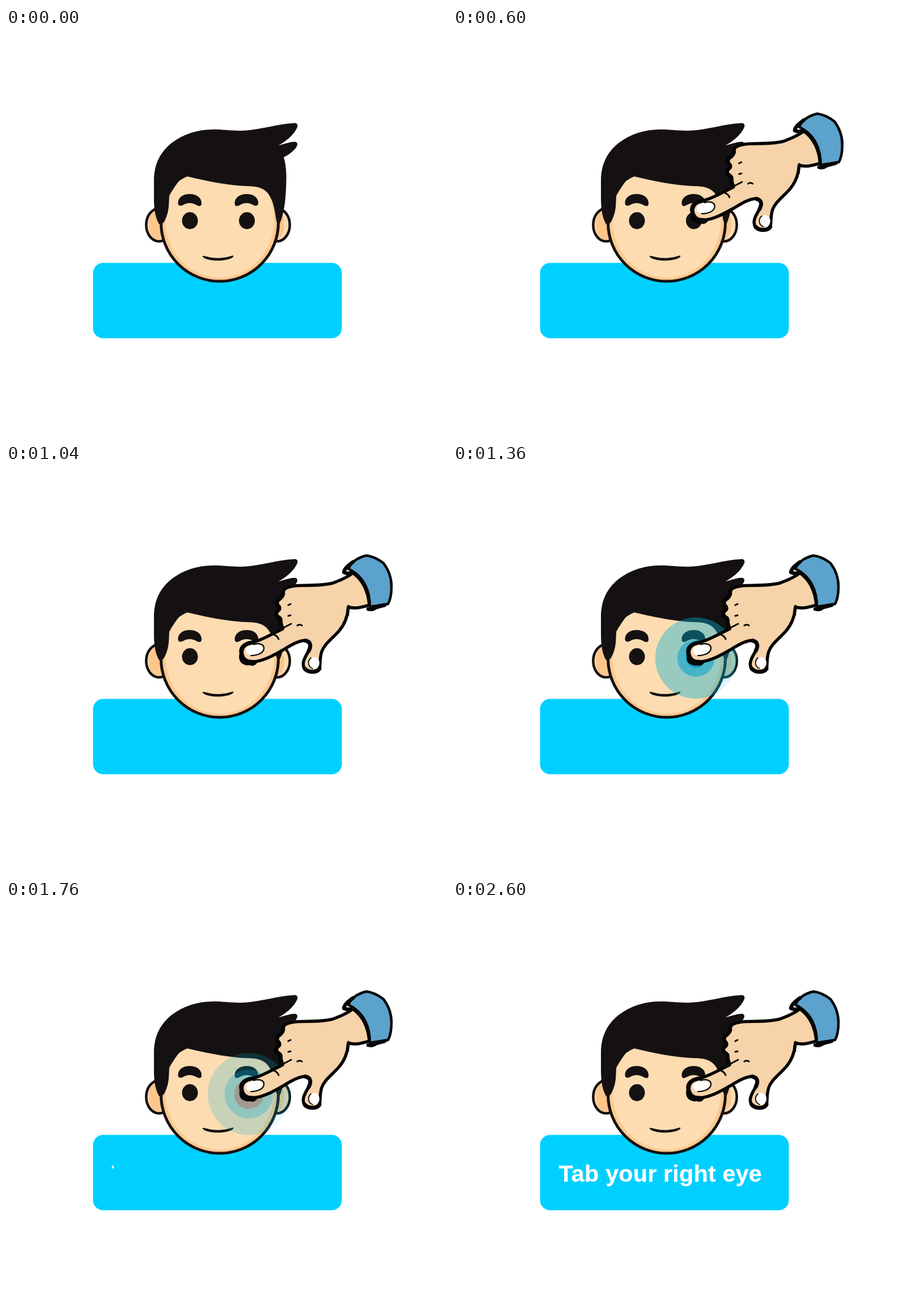
Write an HTML page that moves like this. It is 778 by 720 pixels and loops after 4.8 s.

```html
<!DOCTYPE html>
<html lang="en">
<head>
<meta charset="utf-8">
<title>Tab your right eye</title>
<style>
  html, body { margin: 0; width: 100%; height: 100%; overflow: hidden; background: #fff; }
  svg { display: block; width: 100vw; height: 100vh; }
  text { font: bold 41.3px "Liberation Sans", Arial, sans-serif; letter-spacing: .2px; fill: #fff; stroke: #fff; stroke-width: .3; stroke-linejoin: round; }
</style>
</head>
<body>
<svg viewBox="0 0 778 720">
  <defs>
    <path id="hair" d="M270 346C263 334 261 318 261 300V265C262 240 272 219 292 203C313 187 338 179 366 179C386 179 399 182 420 181C452 179 480 169 507 168C514 167 516 171 513 177C507 189 495 199 481 207C495 204 504 200 511 201C516 203 514 208 511 212C505 219 498 224 490 228C495 244 495 262 494 283C493 307 490 329 483 345Q479 348 477 340C474 324 473 307 463 293C455 282 443 279 425 279C391 278 355 270 320 262C303 269 289 281 288 297C287 307 289 323 280 340Q276 348 270 346Z"/>
    <path id="brow" d="M303.500 308C304 299 312 293 324 293C337 293 345 300 345 309C345 315 341 315 337 313C329 308 320 308 313 312C308 315 303 314 303.500 308Z"/>
    <mask id="tint" maskUnits="userSpaceOnUse" x="330" y="240" width="200" height="200">
      <rect x="330" y="240" width="200" height="200" fill="#555"/>
      <g fill="#fff">
        <circle cx="377" cy="343" r="106"/>
        <ellipse cx="478" cy="347.500" rx="25" ry="31"/>
        <use href="#hair"/>
      </g>
    </mask>
    <clipPath id="wipe"><rect id="edge" x="180" y="455" width="0" height="60"/></clipPath>
  </defs>

  <rect width="778" height="720" fill="#fff"/>
  <rect x="153.500" y="414.500" width="439" height="133" rx="18" fill="#00d0ff"/>

  <g fill="#fddcb1" stroke="#151112" stroke-width="4.500">
    <ellipse cx="270" cy="347.500" rx="22.700" ry="29"/>
    <ellipse cx="478" cy="347.500" rx="22.700" ry="29"/>
  </g>
  <g fill="#fdc68a">
    <ellipse cx="268" cy="347.500" rx="16" ry="26"/>
    <ellipse cx="476" cy="347.500" rx="15" ry="26"/>
  </g>
  <circle cx="377" cy="343.500" r="103.500" fill="#fdc98f" stroke="#151112" stroke-width="5"/>
  <ellipse cx="377" cy="338" rx="96" ry="102.500" fill="#fddcb1"/>
  <g fill="#151112">
    <use href="#hair"/>
    <use href="#brow"/>
    <use href="#brow" transform="matrix(-1 0 0 1 748.500 0)"/>
    <ellipse cx="324.500" cy="340" rx="14" ry="15"/>
    <ellipse cx="425" cy="340" rx="14" ry="15"/>
    <path d="M347 402C352 402 360 406 374 406C388 406 396 402 401 401.500C403 405 392 410.500 374 410.500C356 410.500 345 405 347 402Z"/>
  </g>

  <g id="ripple" mask="url(#tint)">
    <circle class="ring" cx="428.500" cy="342.500"/>
    <circle class="ring" cx="428.500" cy="342.500"/>
    <circle class="ring" cx="428.500" cy="342.500"/>
  </g>

  <text x="186.500" y="496.500" clip-path="url(#wipe)">Tab your right eye</text>

  <g id="hand" stroke="#050505" stroke-width="5.500" stroke-linejoin="round" stroke-linecap="round" fill="none">
    <path fill="#f6d3a9" d="M612 192C602 201 587 206 577 210C557 215 536 214 517 214.500C506 215 496 217 490 222Q488 225 489 229Q487 236 480 240Q476 246 480 250Q485 255 479 259Q474 265 480 270Q486 273 485 279L488 291C471 299 455 309 438 314C424 315 414 321 414 331C415 343 424 350 437 349C457 347 474 336 489 328C502 320 517 311 528 311.500C538 314 538 322 534 330C526 343 521 353 527 362C533 369 549 369 553 362C555 353 553 343 557 331C562 317 576 308 588 294C598 282 603 268 604 252C614 257 630 252 641 249Q638 211 612 192Z"/>
    <path fill="#050505" stroke="none" d="M413 338C420 346 429 345 438 346L447 349C441 350 442 356 434 356C428 354 426 357 421 354C414 352 411 347 413 338Z"/>
    <path stroke-width="7" d="M436 315C424 316 416 321 415.500 332C416 341 420 346 426 348M490 222Q488 225 489 229Q487 236 480 240Q476 246 480 250Q485 255 479 259Q474 265 480 270Q486 273 484 280L487 290M527 361C533 368.500 549 368.500 553 361M528 311.500C539 314 538 322 534 330"/>
    <path stroke-width="3" d="M503 282L472 298M470 300Q478 302 481 309M514 285Q518 282 522 285M498 249L502 247M498 268L502 267M604 250Q600 258 604 266"/>
    <ellipse cx="438.500" cy="328.500" rx="15.500" ry="10" transform="rotate(-8 438 328)" fill="#fff" stroke="none"/>
    <path stroke-width="2.200" d="M437 318.500C448 315 456 319 455 326C454 334 443 338 432 338"/>
    <ellipse cx="543.500" cy="351" rx="9.500" ry="10.500" fill="#fff" stroke="none"/>
    <path stroke-width="1.800" d="M538 342C531 348 533 358 541 361"/>
    <path fill="#5ba2cd" stroke-width="4.500" d="M604 185C608 174 620 165 636 161.500C647 163 657 168 666 175C675 187 680 201 680 216C680 229 678 240 674 247L642 252C642 226 633 199 604 185Z"/>
    <path stroke-width="6.500" d="M612 173C604 179 597 184 596 191Q604 195 612 191M639 256Q646 258 653 253L668 249"/>
  </g>
</svg>
<script>
const LOOP = 4800, STEP = 40;
const $ = id => document.getElementById(id);
const hand = $("hand"), ripple = $("ripple"), edge = $("edge");
const rings = document.querySelectorAll(".ring");

const part = (t, from, to) => Math.min(1, Math.max(0, (t - from) / (to - from)));
const mix = (a, b, p) => a + (b - a) * p;
const smooth = p => p * p * (3 - 2 * p);
const easeOut = p => 1 - (1 - p) ** 3;

function setRing(i, r, rgb, alpha) {
  rings[i].setAttribute("r", r);
  rings[i].setAttribute("fill", `rgb(${rgb.map(Math.round)})`);
  rings[i].setAttribute("fill-opacity", alpha);
}

function drawHand(t) {
  const away = 1 - smooth(part(t, 130, 900));
  hand.setAttribute("transform", `translate(${20 * away} ${-30.5 * away})`);
  hand.setAttribute("opacity", part(t, 0, 200));
}

function drawRipple(t) {
  ripple.setAttribute("visibility", t > 1080 && t < 2060 ? "visible" : "hidden");
  const fade = 1 - part(t, 1480, 2060);
  const turn = part(t, 1520, 1760);
  const late = part(t, 1520, 2000);
  setRing(0, 72.5 * easeOut(part(t, 1080, 1440)), [0, 175, 212], .4 * fade);
  setRing(1, 36 * easeOut(part(t, 1160, 1520)) + 14 * late, [0, 160, 205], .54 * fade);
  setRing(2, 21 * easeOut(part(t, 1240, 1520)) + 10 * late,
    [mix(0, 190, turn), mix(140, 85, turn), mix(185, 60, turn)], .7 * fade);
}

function drawText(t) {
  const u = t - 1760;
  const x = u < 0 ? 180 : 190 + .315 * u + .00013 * u * u;
  edge.setAttribute("width", Math.min(x, 560) - 180);
}

function draw(time) {
  // The last pose holds until the loop restarts.
  const t = Math.min(Math.floor((time % LOOP) / STEP) * STEP, 2600);
  drawHand(t);
  drawRipple(t);
  drawText(t);
}

const start = performance.now();
function tick() {
  draw(performance.now() - start);
  requestAnimationFrame(tick);
}
tick();
</script>
</body>
</html>
```
